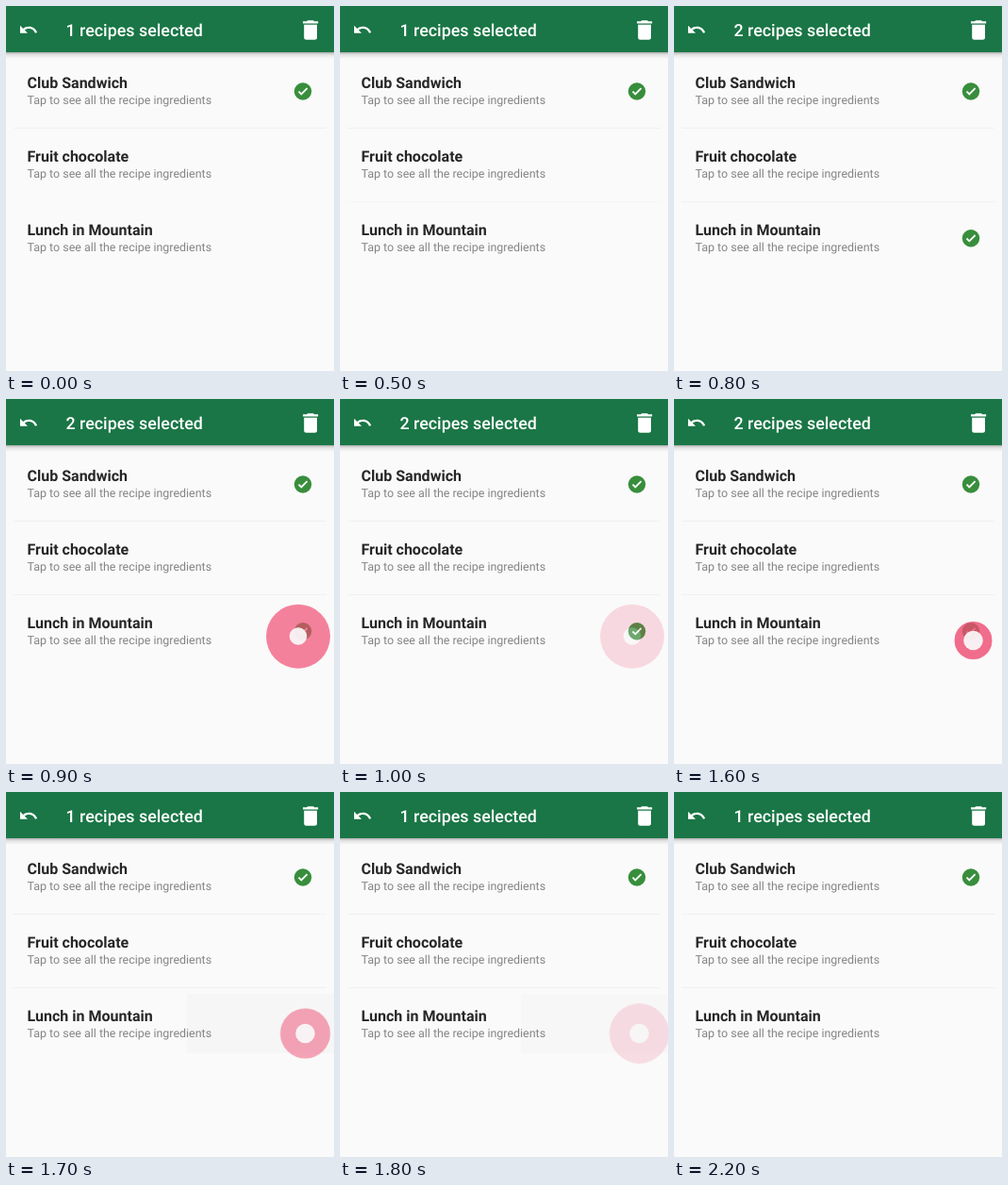
These frames come from a looping animation (348 px wide and 387 px high, 2.4 s). An HTML page:

```html
<!DOCTYPE html>
<html lang="en">
<head>
<meta charset="utf-8">
<title>Recipe selection</title>
<style>
  html, body { margin: 0; width: 100%; height: 100%; overflow: hidden; background: #fafafa; }
  svg { display: block; width: 348px; height: 387px; }
  text { font-family: Roboto, "Noto Sans", sans-serif; text-rendering: geometricPrecision; }
  .bar { font-size: 17.85px; font-weight: 500; fill: #fff; }
  .title { font-size: 16.02px; font-weight: 700; fill: #262626; }
  .sub { font-size: 12.46px; fill: #858585; }
  .line { fill: #f1f1f1; }

  /* The screen redraws ten times a second, so every track holds its value. */
  .anim { animation: 2400ms step-end infinite; }
  .one { animation-name: one; }
  .two, .picked { animation-name: two; }
  .soft { animation-name: soft; }
  .ink { animation-name: ink; }
  .tap { opacity: 0; }
  .tap circle { transform-box: fill-box; transform-origin: center; }
  .tap1 { animation-name: tap1; }
  .tap2 { animation-name: tap2; }
  .grow { animation-name: grow; }

  @keyframes one { 0% { opacity: 1 } 33.33% { opacity: 0 } 70.83%, 100% { opacity: 1 } }
  @keyframes two { 0% { opacity: 0 } 33.33% { opacity: 1 } 70.83%, 100% { opacity: 0 } }
  @keyframes soft { 0% { opacity: .3 } 20.83% { opacity: .5 } 29.16%, 100% { opacity: 1 } }
  @keyframes ink {
    0% { opacity: 0 } 70.83% { opacity: .014 } 75% { opacity: .01 }
    79.16% { opacity: .005 } 83.33%, 100% { opacity: 0 }
  }
  @keyframes tap1 {
    0% { opacity: 0 } 37.5% { opacity: 1 } 41.66% { opacity: .28 } 45.83%, 100% { opacity: 0 }
  }
  @keyframes tap2 {
    0% { opacity: 0 } 66.66% { opacity: 1 } 70.83% { opacity: .62 }
    75% { opacity: .2 } 79.16% { opacity: .06 } 83.33%, 100% { opacity: 0 }
  }
  @keyframes grow {
    0% { transform: scale(.59) } 70.83% { transform: scale(.78) }
    75% { transform: scale(.93) } 79.16%, 100% { transform: scale(1) }
  }
</style>
</head>
<body>
<svg viewBox="0 0 348 387">
  <defs>
    <linearGradient id="shade" x2="0" y2="1">
      <stop offset="0" stop-color="#000" stop-opacity=".3"/>
      <stop offset=".4" stop-color="#000" stop-opacity=".09"/>
      <stop offset="1" stop-color="#000" stop-opacity="0"/>
    </linearGradient>
    <g id="check">
      <circle r="9.2" fill="#388e3c"/>
      <path d="M-4.5 .2L-1.7 3L4.6 -3.3" fill="none" stroke="#fff" stroke-width="1.8"/>
    </g>
  </defs>

  <rect width="348" height="387" fill="#fafafa"/>
  <rect y="49" width="348" height="7" fill="url(#shade)"/>
  <rect width="348" height="49" fill="#1a7646"/>

  <path fill="#fff" transform="translate(13.2 14.6) scale(.885)"
    d="M12.5 8c-2.65 0-5.05.99-6.9 2.6L2 7v9h9l-3.62-3.62c1.39-1.16 3.16-1.88 5.12-1.88 3.54 0 6.55 2.31 7.6 5.5l2.37-.78C21.08 11.03 17.15 8 12.5 8z"/>
  <path fill="#fff" transform="translate(309.3 11.7) scale(1.15)"
    d="M6 19c0 1.1.9 2 2 2h8c1.1 0 2-.9 2-2V7H6v12zM19 4h-3.5l-1-1h-5l-1 1H5v2h14V4z"/>
  <g class="bar">
    <text class="anim one" x="63.5" y="31.8">1 recipes selected</text>
    <text class="anim two" x="63.5" y="31.8">2 recipes selected</text>
  </g>

  <rect class="line" x="8" y="129" width="332" height="1"/>
  <rect class="line anim soft" x="8" y="207" width="332" height="1"/>
  <rect class="anim ink" x="192" y="214" width="156" height="63"/>

  <text class="title" x="22.5" y="86.8">Club Sandwich</text>
  <text class="sub" x="22.5" y="104.3">Tap to see all the recipe ingredients</text>
  <text class="title" x="22.5" y="164.8">Fruit chocolate</text>
  <text class="sub" x="22.5" y="182.3">Tap to see all the recipe ingredients</text>
  <text class="title" x="22.5" y="242.8">Lunch in Mountain</text>
  <text class="sub" x="22.5" y="260.3">Tap to see all the recipe ingredients</text>

  <use href="#check" x="315" y="90.5"/>
  <g class="anim picked"><use href="#check" x="315" y="246.3"/></g>

  <g class="tap anim tap1">
    <circle cx="310" cy="251.7" r="34" fill="#f1476f" fill-opacity=".68"/>
    <circle cx="310" cy="251.5" r="9.3" fill="#fafafa" fill-opacity=".92"/>
  </g>
  <g class="tap anim tap2">
    <circle class="anim grow" cx="317.5" cy="256" r="34" fill="#ee4a70" fill-opacity=".8"/>
    <circle cx="317.5" cy="256" r="10.3" fill="#fafafa" fill-opacity=".92"/>
  </g>
</svg>
</body>
</html>
```
